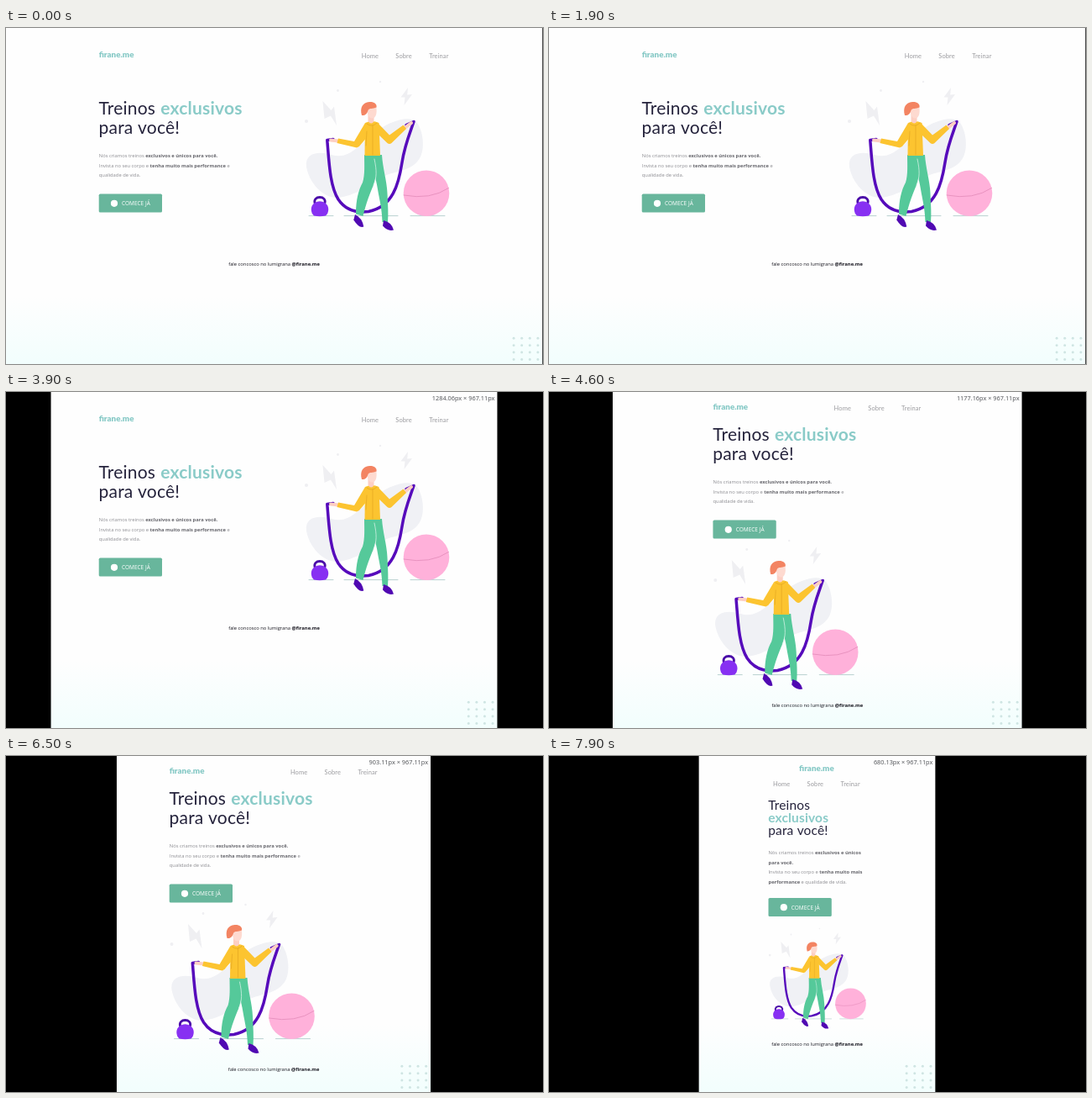
An HTML page for the animation above (8 s loop, 640 by 400 pixels).

```html
<!DOCTYPE html>
<html lang="pt-BR">
<head>
<meta charset="utf-8">
<title>Treinos exclusivos</title>
<style>
  html, body { margin: 0; width: 100%; height: 100%; overflow: hidden; background: #000; }
  svg { display: block; width: 640px; height: 400px; }
  text { font-family: "Open Sans", sans-serif; font-size: 5.8px; }
  .b { font-weight: 700; }
  .logo { font: 900 9.8px Lato, sans-serif; fill: #86c9c6; }
  .nav { font: 400 7.5px Lato, sans-serif; letter-spacing: .1px; fill: #9b9b9f; }
  .title { font: 400 21px Lato, sans-serif; letter-spacing: .01em; word-spacing: .5px; fill: #25233c; }
  .title .b { font-weight: 700; fill: #8acbc8; }
  .small { font-size: 15.5px; }
  .body { fill: #8b8b90; }
  .body .b { fill: #66666c; }
  .cta { font-size: 6.5px; fill: #fff; }
  .foot { fill: #17161f; text-anchor: middle; }
  .size { font: 400 7.35px "Noto Sans", sans-serif; fill: #55575b; text-anchor: end; }
  .limb { fill: none; stroke-linecap: round; stroke-linejoin: round; }
</style>
</head>
<body>
<svg viewBox="0 0 640 400">
  <defs>
    <linearGradient id="fade" x1="0" y1="0" x2="0" y2="1">
      <stop offset=".8" stop-color="#fefefe"/>
      <stop offset="1" stop-color="#f2fefd"/>
    </linearGradient>

    <text id="logo" class="logo" x="110.7" y="35.3">firane.me</text>

    <g id="nav">
      <text class="nav" x="423.7" y="35.6">Home</text>
      <text class="nav" x="464.3" y="35.6">Sobre</text>
      <text class="nav" x="504.2" y="35.6">Treinar</text>
    </g>

    <g id="cta">
      <rect x="110.7" y="197.6" width="75.3" height="22" rx="1.6" fill="#68b69c"/>
      <circle cx="129" cy="208.8" r="4.1" fill="#fff"/>
      <text class="cta" x="138" y="211.2">COMECE JÁ</text>
    </g>

    <g id="hero">
      <text class="title" x="110.5" y="102.8">Treinos <tspan class="b">exclusivos</tspan></text>
      <text class="title" x="110.5" y="125.9">para você!</text>
      <g class="body">
        <text x="110.8" y="154.2">Nós criamos treinos <tspan class="b">exclusivos e únicos para você.</tspan></text>
        <text x="110.8" y="165.8">Invista no seu corpo e <tspan class="b">tenha muito mais performance</tspan> e</text>
        <text x="110.8" y="177.4">qualidade de vida.</text>
      </g>
      <use href="#cta"/>
    </g>

    <text id="foot" class="foot" x="319.5" y="283.2">fale concosco no lumigrana <tspan class="b">@firane.me</tspan></text>

    <g id="art">
      <path fill="#f0f1f5" d="M358 165C356 149 372 146 388 151C412 158 424 134 444 121C460 110 482 103 490 113C498 124 500 148 491 158C481 171 462 170 447 178C431 187 417 200 395 202C376 202 361 183 358 165Z"/>
      <g fill="#efeff2">
        <path d="M377.5 87L387.5 98L391 93.5L394 116L387 104.5L379.5 108Z"/>
        <path d="M479 71L470.5 82.5L475.5 82.5L474.5 92L484 79L478.2 79.5Z"/>
        <circle cx="358" cy="111" r="2"/>
        <circle cx="395.5" cy="74.5" r="1.4"/>
        <circle cx="446" cy="64" r="1.2"/>
      </g>
      <path class="limb" stroke="#a8c6c4" stroke-width=".8" d="M361 223.6H390M403 223.6H467M482 223.6H523"/>

      <path class="limb" stroke="#4a09a8" stroke-width="2.8" d="M368.3 209C364.5 199 383.5 199 379.7 209"/>
      <path fill="#8730f2" d="M368 208Q374 204.5 380 208C386 212 385 220 381 223.5Q374 225 367 223.5C363 220 362 212 368 208Z"/>

      <circle cx="501" cy="196.8" r="27.3" fill="#ffb1da"/>
      <path class="limb" stroke="#e68fbd" stroke-width=".9" d="M474 199Q506 205 527.5 190.5"/>

      <path class="limb" stroke="#560abb" stroke-width="3.5" d="M390 132.5L382.8 133.5C385 160 386 188 396 204C406 219 420 220 432 218.5C461 213 468 186 472 160C475 140 481 126 486 111.5L477 115.5"/>

      <path fill="#55c99a" d="M434 151H448C449 167 454 182 454.5 197C455 210 456 221 455 231L448.5 231C448 214 445 204 443 192C441 178 436 166 434 151Z"/>
      <path fill="#55c99a" d="M427 151H440.5C441 165 442 177 438 187C434 196 429 209 425.5 224L417 221.5C417 205 420 193 425 184C428 175 427 162 427 151Z"/>
      <path class="limb" stroke="#e6f6ef" stroke-width=".7" d="M439 156C442 170 442 178 438 187"/>
      <path fill="#5009b2" d="M416 222Q424.5 226 426.3 236.5Q421 239 414.3 228.5Z"/>
      <path fill="#5009b2" d="M450 229Q460 231.5 462 240.5Q455 242.5 449 235.5Z"/>

      <path class="limb" stroke="#fdcfc3" stroke-width="4" d="M387 133.5L396 134.5M475 119L483 113"/>
      <path fill="#fcc430" d="M428 113L415 135L396 131.500L394.500 137L418 142.500Q421 142 423 138.500L432 128Z"/>
      <path fill="#fcc430" d="M443 113L457 127.500L473.500 115.500L477 120L459.500 137Q457 139 454.500 137L444 127Z"/>
      <path fill="#fcc430" d="M428 113Q436 109 444.500 113L446 152H427.500Z"/>
      <path class="limb" stroke="#e3a722" stroke-width=".7" d="M437 116V151M430 123L429 140M430 114Q436 119 442 113"/>

      <path fill="#fdcfc3" d="M431.500 103H438.500V111Q435.500 116 431.500 111Z"/>
      <path fill="#fedad0" d="M430 94H441.300C442.500 102 440.500 107.500 436.500 107.500C432 107.500 430 102 430 94Z"/>
      <path fill="#f38462" d="M424 104C421.500 95 425 88.500 433 88C438 87.500 442.500 90 441.500 94.500C437 96.500 433 95 431.500 98C430.500 102 428 104.500 424 104Z"/>
    </g>

    <g id="dots" fill="#cfe5e3"></g>
  </defs>

  <rect width="640" height="400"/>
  <rect id="page" height="400" fill="url(#fade)"/>
  <use id="corner" href="#dots"/>

  <g class="layout">
    <use href="#logo"/>
    <use href="#nav"/>
    <use href="#hero"/>
    <use href="#art"/>
    <use href="#foot"/>
  </g>

  <g class="layout">
    <use href="#logo" x="84.5" y="-14"/>
    <use href="#nav" x="-84.3" y="-13.6"/>
    <use href="#hero" x="84.5" y="-45"/>
    <use href="#art" x="-160" y="113"/>
    <use href="#foot" y="92.3"/>
  </g>

  <g class="layout">
    <use href="#logo" x="187.3" y="-17.3"/>
    <use href="#nav" x="-156.7" y=".6"/>
    <text class="title small" x="261.2" y="64.3">Treinos</text>
    <text class="title small" x="261.2" y="79.3"><tspan class="b">exclusivos</tspan></text>
    <text class="title small" x="261.2" y="94.3">para você!</text>
    <g class="body">
      <text x="261.5" y="117.2">Nós criamos treinos <tspan class="b">exclusivos e únicos</tspan></text>
      <text x="261.5" y="128.8"><tspan class="b">para você.</tspan></text>
      <text x="261.5" y="140.4">Invista no seu corpo e <tspan class="b">tenha muito mais</tspan></text>
      <text x="261.5" y="152"><tspan class="b">performance</tspan> e qualidade de vida.</text>
    </g>
    <use href="#cta" x="150.8" y="-28.6"/>
    <use href="#art" transform="translate(22.3 162.4) scale(.673)"/>
    <use href="#foot" y="62.3"/>
  </g>

  <text id="size" class="size" y="9.5"></text>
</svg>

<script>
const LOOP = 8000, STEP = 100, START = 1900;
const SCALE = 2.414;      // viewport px per stage px
const WIDE = 1200, MEDIUM = 768;
const BASE_CENTER = 319.5;

// time, viewport width, page centre
const keys = [
  [START, 1544, 319.5], [2800, 1429.33, 320], [3900, 1284.06, 319.5],
  [5400, 1054.98, 320], [6500, 903.11, 319], [7900, 680.13, 319.5]
];

const $ = id => document.getElementById(id);
const page = $('page'), size = $('size'), corner = $('corner');
const layouts = [...document.querySelectorAll('.layout')];

// Dot grid, placed relative to the page's right edge
for (let i = 0; i < 16; i++) {
  const dot = document.createElementNS('http://www.w3.org/2000/svg', 'circle');
  dot.setAttribute('cx', -5.4 - (i % 4) * 9.6);
  dot.setAttribute('cy', 369.3 + Math.floor(i / 4) * 8.4);
  dot.setAttribute('r', 1.5);
  $('dots').append(dot);
}

function sample(t) {
  if (t <= START) return keys[0].slice(1);
  const i = keys.findIndex(k => k[0] >= t);
  const a = keys[i - 1], b = keys[i];
  const f = (t - a[0]) / (b[0] - a[0]);
  return [1, 2].map(n => a[n] + (b[n] - a[n]) * f);
}

function render(t) {
  const [width, center] = sample(t);
  const half = width / SCALE / 2;
  const left = center - half, right = center + half;
  page.setAttribute('x', left);
  page.setAttribute('width', right - left);
  corner.setAttribute('x', right);

  const active = width >= WIDE ? 0 : width >= MEDIUM ? 1 : 2;
  layouts.forEach((g, i) => {
    g.style.display = i === active ? '' : 'none';
    g.setAttribute('transform', `translate(${center - BASE_CENTER} 0)`);
  });

  size.setAttribute('x', right - 3);
  size.textContent = t > START ? `${width.toFixed(2)}px × 967.11px` : '';
}

function tick() {
  const t = performance.now() % LOOP;
  render(Math.floor(t / STEP) * STEP);
  requestAnimationFrame(tick);
}
tick();
</script>
</body>
</html>
```
